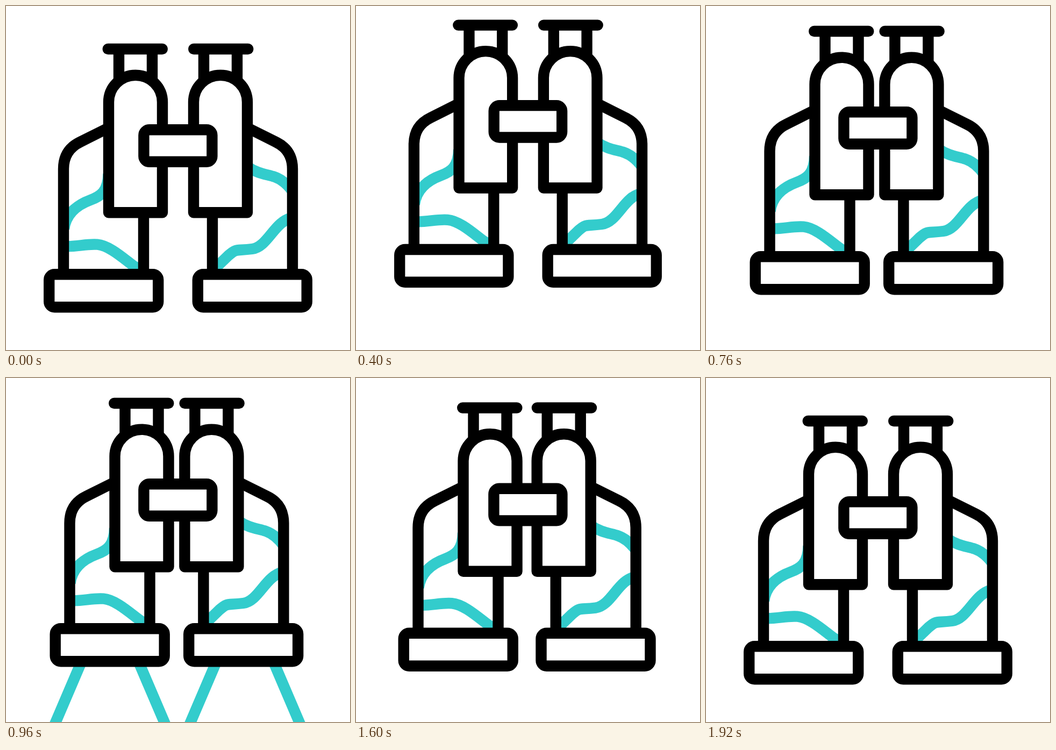
These frames come from a looping animation (640 px wide and 640 px high, 2000 ms). An HTML page:

```html
<!DOCTYPE html>
<html lang="en">
<head>
<meta charset="utf-8">
<title>Binoculars</title>
<style>
  html, body { margin: 0; width: 100%; height: 100%; overflow: hidden; background: #fff; }
  svg { display: block; width: 100%; height: 100%; }
  .ink { fill: #fff; stroke: #000; stroke-width: 20.4; stroke-linejoin: round; }
  .teal { fill: none; stroke: #3cc; stroke-width: 20.4; }
</style>
</head>
<body>
<svg viewBox="0 0 640 640">
  <defs>
    <g id="half" class="ink">
      <path fill="none" d="M107 499V303Q107 268 138 253L191 226.500M256 384V499"/>
      <rect x="80.200" y="499.200" width="203" height="61" rx="10.200"/>
      <path d="M210 80V140M272 80V140"/>
      <path d="M189.700 80H290.800" stroke-linecap="round"/>
      <path d="M191 384.200V178.700a50 50 0 0 1 100 0V384.200Z"/>
    </g>
  </defs>
  <path id="beams" class="teal"/>
  <g id="body">
    <g id="left">
      <path class="teal" d="M190.500 312C190 345 176 354 157 361S112 383 108 415"/>
      <path class="teal" d="M107 447C130 449 148 442 170 443.700S219 470 238 484L256 493"/>
      <use href="#half"/>
    </g>
    <g id="right">
      <path class="teal" d="M449 299C470 313 486 313 500 318S524 332 534 346"/>
      <path class="teal" d="M534 394C500 398 488 448 458 452S430 450 414 464L384 493"/>
      <use href="#half" transform="matrix(-1 0 0 1 640 0)"/>
    </g>
    <rect class="ink" x="256.400" y="230.200" width="127" height="59.600" rx="10.200"/>
  </g>
</svg>
<script>
  const LOOP = 2000, STEP = 40;
  const [body, left, right, beams] =
    ["body", "left", "right", "beams"].map(id => document.getElementById(id));

  // Two spreading rays under each lens.
  const ray = (x, side) => `M${x + side * 49.7} 520L${x + side * 118.1} 680`;
  beams.setAttribute("d", [193.5, 444.5].map(x => ray(x, -1) + ray(x, 1)).join(""));

  function draw(ms) {
    const t = Math.floor((ms % LOOP) / STEP) * STEP;
    const ease = (from, to) => {
      const p = Math.min(1, Math.max(0, (t - from) / (to - from)));
      return p * p * (3 - 2 * p);
    };

    const crouch = ease(80, 240), jump = ease(240, 440), land = ease(440, 600);
    const open = ease(600, 760), home = ease(1440, 1920);
    const y = 37 * crouch - 92 * jump + 22 * land + 33 * home;
    const scale = 1 - 0.04 * (crouch - jump);
    // The halves close until the lenses touch, then part to a resting gap.
    const slide = (touch, rest) => touch * land + (rest - touch) * open - rest * home;

    body.setAttribute("transform",
      `translate(320 ${320 + y}) scale(${scale}) translate(-320 -320)`);
    left.setAttribute("transform", `translate(${slide(25.6, 11.5)} 0)`);
    right.setAttribute("transform", `translate(${slide(-28, -16.6)} 0)`);
    beams.setAttribute("opacity", ease(760, 960) - ease(1280, 1440));
  }

  const start = performance.now();
  function tick() {
    draw(performance.now() - start);
    requestAnimationFrame(tick);
  }
  tick();
</script>
</body>
</html>
```
